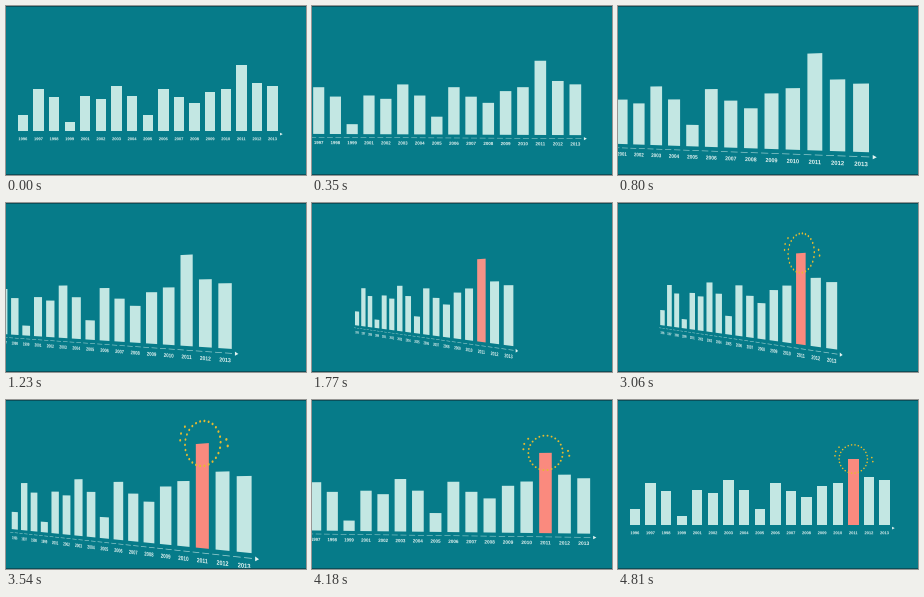
Write a matplotlib script that moves like this. It is 300x169 px and loops after 4.88 s.

```python
import numpy as np
import matplotlib.pyplot as plt
from matplotlib.animation import FuncAnimation
from matplotlib.colors import to_rgb
from matplotlib.patches import PathPatch
from matplotlib.path import Path
from matplotlib.textpath import TextPath

W, H, DPI = 300, 169, 100
STEP, LOOP = 40, 4880

TEAL, MINT, CORAL = "#067b89", "#c3e7e3", "#fa8a7e"
YELLOW, LABEL, AXIS, EDGE = "#e6bb30", "#e4f4f2", "#93cbcd", "#0a505b"

PITCH, BAR_W = 15.6, 10.4
YEARS = [1996, 1997, 1998, 1999, *range(2001, 2014)]
VALUES = [16, 42.5, 34, 9, 35, 32, 45, 35, 16, 42.5, 34, 28.5, 39, 42.5, 66, 48, 45]
LAST = len(YEARS) - 1
PEAK = YEARS.index(2011)
PEAK_X, PEAK_H = PEAK * PITCH, VALUES[PEAK]
SPARKS = [(-14.3, 11.8), (-17.6, 7.6), (-18.3, 3.2), (18.5, 1.4), (19.5, -2.6)]

# Camera poses: time, then x, x slope, depth, y, y slope and scale,
# all measured from the last bar towards the first.
REST = (266.5, -15.6, 0, 125, 0, 1)
POSES = [
    (130, *REST),
    (660, 250, -20.7, .010, 143, .87, 1.49),
    (800, 243, -19.85, .0165, 146, 1.61, 1.52),
    (1200, 219, -14.8, .0245, 145.5, 2.25, 1.45),
    (1760, 196.5, -7.98, .033, 142.5, 2.79, 1.34),
    (2480, 206, -8.58, .034, 144.3, 2.80, 1.42),
    (3310, 219.5, -9.4, .0352, 147, 2.83, 1.53),
    (3540, 240, -14.37, .035, 152.5, 3.1, 1.70),
    (3890, 273.5, -18.2, .016, 143, 1.27, 1.45),
    (4180, 271.5, -17.8, .005, 133, .47, 1.215),
    (4500, *REST),
]
KEYS = np.array(POSES)[:, 0]
CAMS = np.array(POSES)[:, 1:]


def key_slopes():
    """Monotone slopes: flat at the ends and at turning points."""
    d = np.diff(CAMS, axis=0) / np.diff(KEYS)[:, None]
    a, b = d[:-1], d[1:]
    same = a * b > 0
    inner = np.where(same, 2 * a * b / np.where(same, a + b, 1), 0)
    flat = np.zeros((1, CAMS.shape[1]))
    return np.vstack([flat, inner, flat])


SLOPES = key_slopes()


def camera(ms):
    ms = np.clip(ms, KEYS[0], KEYS[-1])
    i = min(np.searchsorted(KEYS, ms, side="right") - 1, len(KEYS) - 2)
    span = KEYS[i + 1] - KEYS[i]
    u = (ms - KEYS[i]) / span
    return ((1 + 2 * u) * (1 - u) ** 2 * CAMS[i] + u * (1 - u) ** 2 * span * SLOPES[i]
            + u * u * (3 - 2 * u) * CAMS[i + 1] - u * u * (1 - u) * span * SLOPES[i + 1])


def project(path, cam):
    """Map a path from the chart plane onto the stage."""
    x0, dx, depth, y0, dy, scale = cam
    t = LAST - path.vertices[:, 0] / PITCH
    w = 1 + depth * t
    x = (x0 + dx * t) / w
    y = (y0 + dy * t - scale * path.vertices[:, 1]) / w
    return Path(np.column_stack([x, y]), path.codes)


def smooth(ms, start, end):
    u = np.clip((ms - start) / (end - start), 0, 1)
    return u * u * (3 - 2 * u)


def pop(ms, start, end, over=2.8):
    """Grow from 0 to 1 with a little overshoot."""
    u = np.clip((ms - start) / (end - start), 0, 1) - 1
    return max(0, 1 + (over + 1) * u ** 3 + over * u ** 2)


def join(polys):
    return Path.make_compound_path(*[Path([*p, p[0]], closed=True) for p in polys])


def box(x, y, w, h):
    return [(x, y), (x + w, y), (x + w, y + h), (x, y + h)]


def bar(i):
    return box(i * PITCH - BAR_W / 2, 0, BAR_W, VALUES[i])


def disc(x, y, r):
    a = np.linspace(0, 2 * np.pi, 12, endpoint=False)
    return list(zip(x + r * np.cos(a), y + r * np.sin(a)))


def year_label(i):
    font = {"family": "Liberation Sans", "weight": "bold"}
    text = TextPath((0, 0), str(YEARS[i]), size=4, prop=font)
    mid = text.get_extents()
    offset = (i * PITCH - (mid.x0 + mid.x1) / 2, -9.2)
    return Path(text.vertices + offset, text.codes)


def burst(ms):
    """Ring of dots around the peak with a few sparks outside it."""
    ring, spark = pop(ms, 1840, 2200), pop(ms, 2000, 2300)
    dots = []
    if ring > 0:
        for a in np.linspace(0, 2 * np.pi, 26, endpoint=False):
            dots.append(disc(PEAK_X + 14.2 * ring * np.cos(a),
                             PEAK_H + 14.2 * ring * np.sin(a), .8 * min(ring, 1)))
    if spark > 0:
        for x, y in SPARKS:
            dots.append(disc(PEAK_X + x * spark, PEAK_H + y * spark, .85 * min(spark, 1)))
    return join(dots) if dots else None


fig = plt.figure(figsize=(W / DPI, H / DPI), dpi=DPI, facecolor=TEAL)
ax = fig.add_axes([0, 0, 1, 1])
ax.set_xlim(0, W)
ax.set_ylim(H, 0)
ax.axis("off")

AXIS_END = LAST * PITCH + 8.6
dashes = [box(x, -3.3, 5.4, .5) for x in np.arange(-PITCH / 2, AXIS_END - 6, PITCH / 2)]
arrow = [(AXIS_END - 1, -1.7), (AXIS_END + 1.6, -3.1), (AXIS_END - 1, -4.5)]


def layer(color, path=None, z=1):
    patch = PathPatch(path or Path([(0, 0)]), facecolor=color, lw=0, zorder=z)
    ax.add_patch(patch)
    return patch, path


layers = [
    layer(AXIS, join(dashes)),
    layer(LABEL, join([arrow])),
    layer(MINT, join([bar(i) for i in range(LAST + 1) if i != PEAK])),
    layer(LABEL, Path.make_compound_path(*[year_label(i) for i in range(LAST + 1)])),
]
peak, peak_path = layer(MINT, join([bar(PEAK)]), 2)
layers.append((peak, peak_path))
dots, _ = layer(YELLOW, z=3)
for y in (0, H - 1):
    ax.add_patch(plt.Rectangle((0, y), W, 1, facecolor=EDGE, lw=0, zorder=4))


def draw(n):
    ms = n * STEP
    cam = camera(ms)
    for patch, path in layers:
        patch.set_path(project(path, cam))
    mix = smooth(ms, 1400, 1840)
    peak.set_facecolor(np.array(to_rgb(MINT)) * (1 - mix) + np.array(to_rgb(CORAL)) * mix)
    ring = burst(ms)
    dots.set_visible(ring is not None)
    if ring is not None:
        dots.set_path(project(ring, cam))
    return [patch for patch, _ in layers] + [dots]


anim = FuncAnimation(fig, draw, frames=LOOP // STEP, interval=STEP, repeat=True,
                     repeat_delay=0, blit=False)
plt.show()
```
